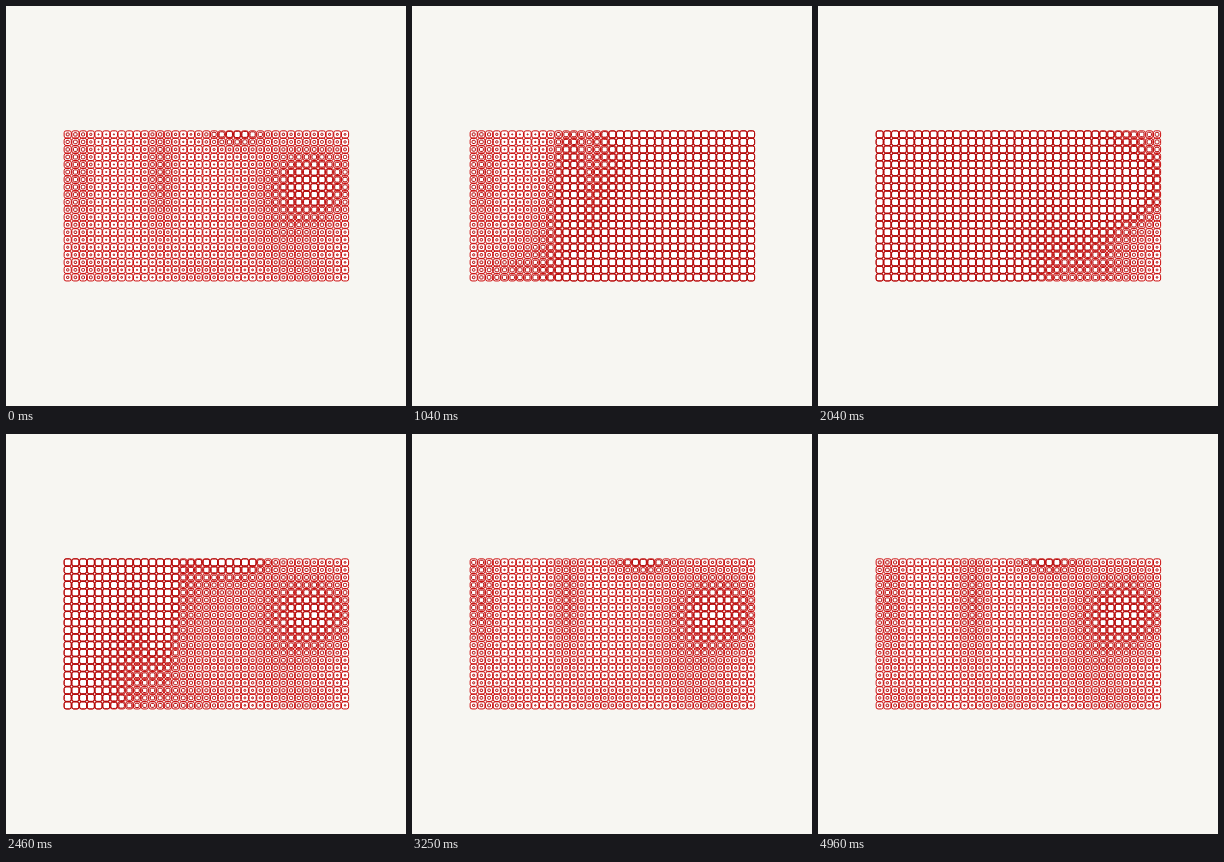
Write an HTML page with a canvas that moves like this. It is 400 by 400 pixels and loops after 5000 ms.

```html
<!DOCTYPE html>
<html>
<head>
<meta charset="utf-8">
<style>
html, body { margin: 0; width: 100%; height: 100%; overflow: hidden; background: #f7f6f2; }
canvas { display: block; width: 400px; height: 400px; }
</style>
</head>
<body>
<canvas id="stage"></canvas>
<script>
const LOOP = 5, COLS = 37, ROWS = 20;
const X0 = 61.7, Y0 = 128.4, DX = 7.704, DY = 7.526, SIZE = 7.1;
const canvas = document.getElementById('stage');
const ctx = canvas.getContext('2d');
const ratio = window.devicePixelRatio || 1;
canvas.width = canvas.height = 400 * ratio;
ctx.scale(ratio, ratio);

const clamp = (v, lo, hi) => Math.min(hi, Math.max(lo, v));
const ease = p => (1 - Math.cos(Math.PI * clamp(p, 0, 1))) / 2;
const bell = d => Math.exp(-d * d / 2);
const ripple = (d, period) => Math.cos(2 * Math.PI * d / period);

// Resting field: stripes on the left, a faint lower edge, and three round hills
function restAt(x, y) {
  const stripes = x < 200 ? Math.max(0, ripple(x - 70, 85)) * bell((y - 167) / 48) : 0;
  const edge = (1 + ripple(x - 85, 108)) / 2 * bell((y - 270) / 14);
  const disc = bell(Math.hypot((x - 305) / 34, (y - 178) / 28));
  const cap = bell(Math.hypot((x - 230) / 22, (y - 120) / 14));
  const pool = bell(Math.hypot(x - 272, y - 235) / 28);
  return 0.15 + 0.45 * stripes + 0.22 * edge + 0.78 * disc + 0.85 * cap + 0.25 * pool;
}

const cells = Array.from({ length: COLS * ROWS }, (_, i) => {
  const x = X0 + i % COLS * DX, y = Y0 + Math.floor(i / COLS) * DY;
  const far = (343 - x + (276 - y) / 2) / 361;
  return { x, y, far, rest: restAt(x, y) };
});

// The swell travels from the lower right to the upper left
function level({ far, rest }, t) {
  const rise = ease((t - 1.6 * far * far) / 1.1);
  const fall = ease((t - 1.12 - 1.43 * far) / 1.1);
  return clamp(rest + rise - fall, 0.06, 1);
}

function squares(color, sizeOf, fill) {
  ctx.beginPath();
  for (const c of cells) {
    const s = sizeOf(c);
    ctx.roundRect(c.x - s / 2, c.y - s / 2, s, s, s * 0.27);
  }
  if (fill) {
    ctx.fillStyle = fill;
    ctx.fill();
  }
  ctx.strokeStyle = color;
  ctx.stroke();
}

function draw(now) {
  const t = (now / 1000 + 0.1) % LOOP;
  ctx.fillStyle = '#f7f6f2';
  ctx.fillRect(0, 0, 400, 400);
  squares('#cc0c0c', () => SIZE, '#fff');
  squares('#b00a0a', c => SIZE * level(c, t));
  requestAnimationFrame(draw);
}
requestAnimationFrame(draw);
</script>
</body>
</html>
```
